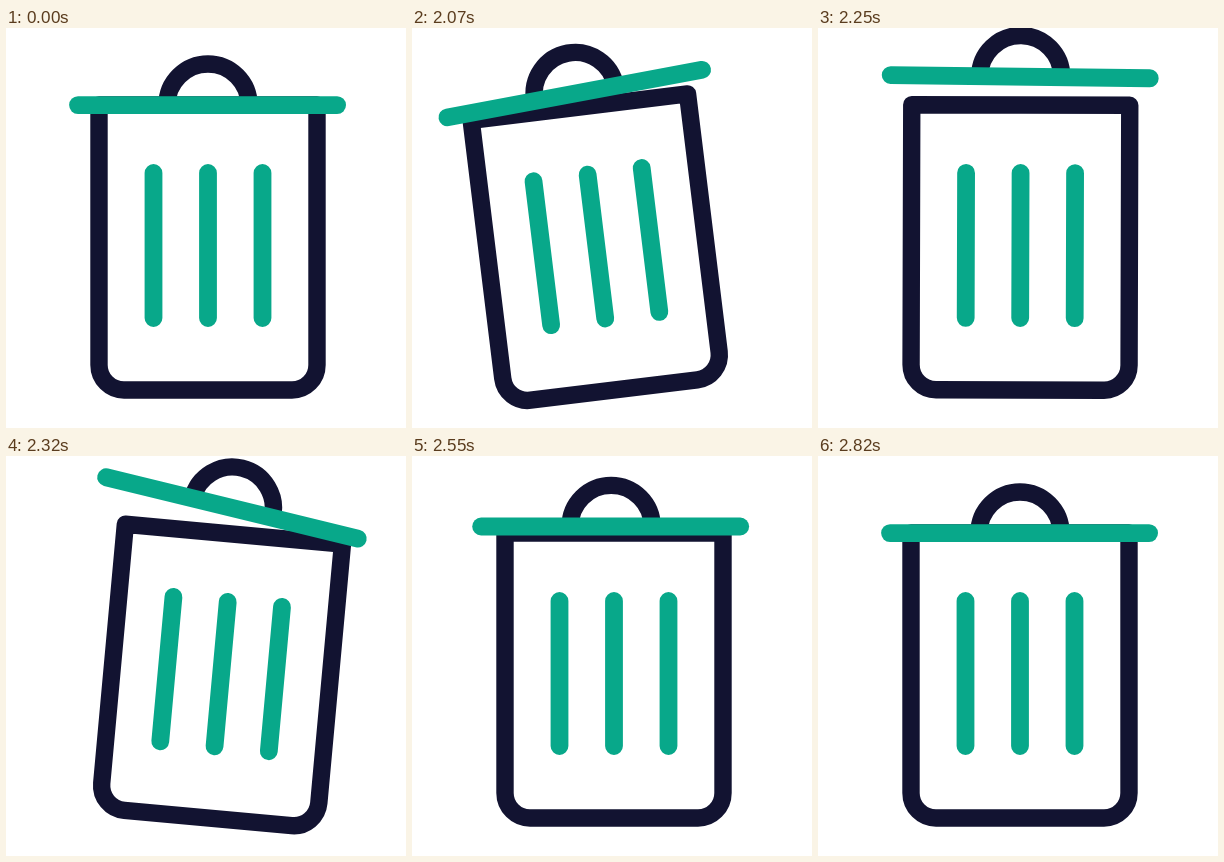
Write an HTML page that moves like this. It is 400 px wide and 400 px high and loops after 2850 ms.

```html
<!DOCTYPE html>
<html lang="en">
<head>
<meta charset="utf-8">
<title>Trash bin</title>
<style>
  html, body { margin: 0; width: 100%; height: 100%; overflow: hidden; background: #fff; }
  svg { display: block; width: 100vw; height: 100vh; fill: none; }
  .navy { stroke: #121331; stroke-width: 17.4; stroke-linejoin: round; }
  .green { stroke: #08a88a; stroke-width: 17.8; stroke-linecap: round; }
</style>
</head>
<body>
<svg viewBox="0 0 400 400">
  <g id="bin">
    <path class="navy" d="M93 77H311V337a25 25 0 0 1-25 25H118a25 25 0 0 1-25-25Z"/>
    <path class="green" d="M147.5 145V290M202 145V290M256.5 145V290"/>
    <g id="lid">
      <path class="navy" d="M161 77a41 41 0 0 1 82 0"/>
      <path class="green" d="M72 77.1H331.1"/>
    </g>
  </g>
</svg>
<script>
  const LOOP = 2850, STEP = 25, START = 2025;
  const bin = document.getElementById('bin');
  const lid = document.getElementById('lid');

  // Polynomial close to cubic-bezier(.42, 0, .58, 1)
  const ease = p => p * p * (1.5 + p * (4 + p * (3 * p - 7.5)));

  function pose(t) {
    // Eased rise from 0 to 1 between two times
    const ramp = (from, to) => ease(Math.min(1, Math.max(0, (t - from) / (to - from))));
    // Up at the first pair of times, down at the second
    const pulse = (a, b, c, d) => ramp(a, b) - ramp(c, d);

    const sway = 5.3 * pulse(2157, 2313, 2313, 2441) - 9.8 * pulse(1935, 2157, 2157, 2313);
    const tilt = 8.5 * pulse(2170, 2325, 2325, 2545) - 8.3 * pulse(1994, 2170, 2170, 2325);
    const lift = 28.6 * pulse(1962, 2190, 2222, 2712);
    const slide = -3.8 * pulse(1945, 2165, 2165, 2265) - 8.3 * pulse(2265, 2390, 2390, 2660);

    bin.setAttribute('transform', `rotate(${sway} 202 362)`);
    lid.setAttribute('transform', `translate(${slide} ${-lift}) rotate(${tilt} 201.6 77)`);
  }

  function draw() {
    // The motion runs at 40 steps a second and starts with a hard cut.
    const now = performance.now() % LOOP;
    const step = Math.floor((now + 5) / STEP) * STEP;
    pose(step < START ? 0 : step);
    requestAnimationFrame(draw);
  }
  draw();
</script>
</body>
</html>
```
